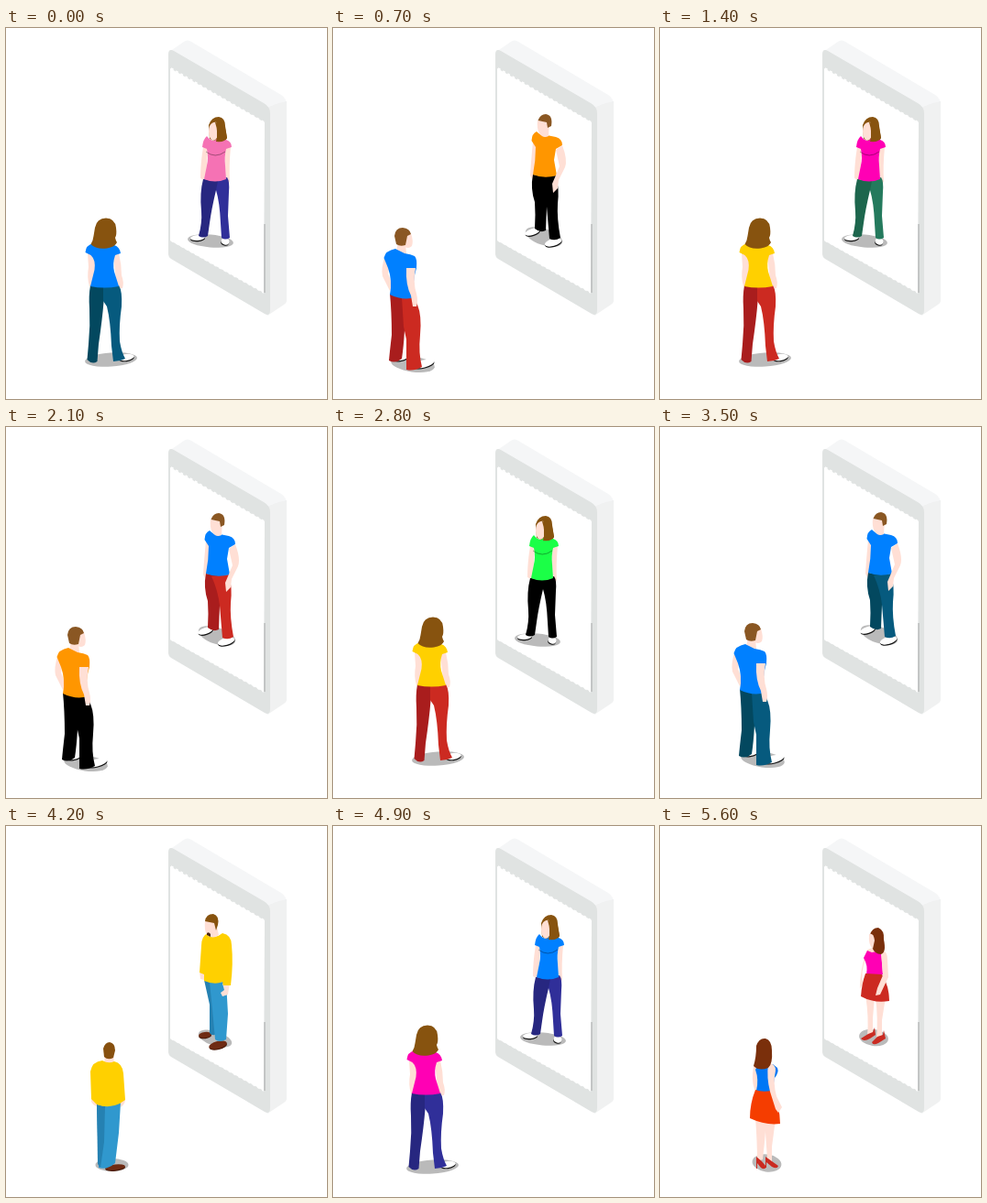
These frames come from a looping animation (350x405 px, 6300 ms). An HTML page:

```html
<!DOCTYPE html>
<html lang="en">
<head>
<meta charset="utf-8">
<title>Mirror outfits</title>
<style>
html, body { margin: 0; width: 100%; height: 100%; overflow: hidden; background: #fff }
svg { display: block; width: 100vw; height: 100vh }
</style>
</head>
<body>
<svg viewBox="0 0 350 405">
  <path fill="#f5f6f7" d="M178 26L194 15Q198 12 202 15L300 73Q306 77 306 84L288 92Z"/>
  <path fill="#f0f1f1" d="M285 88Q290 83 306 80V298Q306 300 303 302L285 314Z"/>
  <path fill="#e0e3e2" d="M177 29Q177 22 183 25L281 82Q288 86 288 93V308Q288 315 282 312L180 252Q177 250 177 247Z"/>
  <path fill="#fff" d="M179 44L282 103L281 289L179 232Z"/>
  <path fill="none" stroke="#fff" stroke-width="1.500" stroke-dasharray="3" d="M180 44L282 103M180 232L281 289"/>
  <path fill="none" stroke="#a5a7a7" d="M282 214V289"/>
  <g id="cast"></g>
</svg>
<script>
const SKIN = '#ffdfd5', BROWN = '#87530f', AUBURN = '#7a2f0b', SHADOW = '#bababa';

const shape = (fill, d) => `<path fill="${fill}" d="${d}"/>`;
const shadow = (x, y, rx, ry, turn = 0) =>
  `<ellipse cx="${x}" cy="${y}" rx="${rx}" ry="${ry}" fill="${SHADOW}" transform="rotate(${turn} ${x} ${y})"/>`;
const shoe = (x, y, rx, ry, turn, fill = '#fff', sole = '#111') =>
  `<g transform="translate(${x} ${y}) rotate(${turn})"><ellipse cy="1.200" rx="${rx}" ry="${ry}" fill="${sole}"/>
  <ellipse rx="${rx}" ry="${ry}" fill="${fill}"/></g>`;

// Each figure takes a top colour and a [dark, light] pair for the lower garment.
const womanBack = (top, [dark, light]) =>
  shadow(114.500, 362, 28.500, 7.500, -4) +
  shoe(131, 359.500, 8.500, 3.500, -8) +
  shape(SKIN, 'M89 246L97 247L97 268L96 284L91 282Q88 272 90 261Z') +
  shape(SKIN, 'M117 248L123 246Q126 258 126 270Q129 278 127 284L121 284Z') +
  shape(dark, 'M92 281Q90 292 91 306Q92 325 90 345L88.500 362Q94 368 99.500 364L101 345Q105 318 106.500 299L109 282Z') +
  shape(light, 'M106 283L123 281Q127 287 126 304Q123 325 124 342Q126 354 130 361Q124 364 117 364L115 347Q114 320 110 304L106 298Z') +
  shape(top, 'M95 235Q87 237 86.500 245L92.500 248Q98 253 96.500 264L92 282Q107 285 123 282L118 266Q116 257 119 248L125 246Q124 239 118 237Z') +
  shape(BROWN, 'M97 218Q99 207.500 109 207.500Q119 208 120 218Q121 226 119 229Q120 233 121 234Q119 239 110 240.500Q98 242 92.500 236Q95 232 95.500 227Z');

const womanFront = (top, [dark, light]) =>
  shadow(223, 232.500, 25, 7, 5) +
  shoe(209, 229, 8, 3, -5) + shoe(239, 233, 4.500, 3.500, 15) +
  shape(SKIN, 'M215 130L220 132L219 150L217 167L212 164Q212 148 215 130Z') +
  shape(SKIN, 'M238 131L245 130Q243 150 244 168L240 171Z') +
  shape(light, 'M215 165Q228 169 241 163Q244 167 243 179L242 205L244 229Q239 232 235 229L234 213Q233 190 229 177Z') +
  shape(dark, 'M215 165L231 167L229 177Q224 198 222 213L220 227Q215 230 210 227Q214 213 213 200Q211 180 215 165Z') +
  shape(BROWN, 'M221 106Q224 97 232 97Q239 98 239 107L241 120Q239 125 231 125L222 121Z') +
  shape(top, 'M219 118Q215 121 214 130L219 132Q221 142 219 150L216 165Q228 170 240 165L239 150Q238 140 240 132L246 130Q246 124 240 122L230 121Q225 126 219 118Z') +
  '<path fill="none" stroke="#0005" d="M218 135Q228 143 239 135"/>' +
  shape(SKIN, 'M222 107Q225 102 230 103L230 120Q226 126 222 119Q220 113 222 107Z') +
  shape(BROWN, 'M228 103L238 104L241 120Q239 125 229 124Q232 115 228 103Z');

const manBack = (top, [dark, light]) =>
  shadow(87, 367, 24, 8.500, 8) +
  shoe(73, 359.500, 9, 3.500, -8) + shoe(99, 366.500, 11.500, 4, -14) +
  shape(SKIN, 'M57 248Q52 262 54 271L62 287L65 281L60 268L62 256Z') +
  shape(dark, 'M62 290L82 294L78 330Q77 348 75 361Q68 367 61 363Q62 352 64 335Q64 310 62 290Z') +
  shape(light, 'M75 294L89 294L92 302Q97 314 95 335Q93 355 97 370Q88 375 80 373L80 340L77 326Z') +
  shape(SKIN, 'M71 233L79 234L80 247L69 244Z') +
  shape(top, 'M68 241Q57 243 55.500 251L60 262Q65 276 62 291Q76 298 90 294L88 277Q89 268 91 262Q92 252 89 249Q85 247 78 246Z') +
  shape(SKIN, 'M80 262L90 262Q87 278 91 290Q93 298 91 304L87 304L85 292Q79 280 80 262Z') +
  shape(SKIN, 'M79 223L85 224Q88 233 86 238Q82 242 77 238Z') +
  shape('#8a5723', 'M67 227Q68 218 76 218Q84 219 85 225L81 227L79 237Q73 239 69 236Z');

const manFront = (top, [dark, light]) =>
  shadow(230, 228, 21, 9, 18) +
  shoe(217.500, 222.500, 8.500, 3.500, -18) + shoe(240, 234, 9.500, 4, -16) +
  shape(SKIN, 'M218 124L223 130L221 150L218 167L215 161Q216 145 218 124Z') +
  shape(dark, 'M218 160L236 163L233 195L232 221Q226 224 220 219Q221 204 220 190Q215 175 218 160Z') +
  shape(light, 'M224 163L243 161Q247 175 245 192Q244 208 248 229Q242 233 236 230L233 195Q231 178 224 163Z') +
  shape(top, 'M222 113Q217 115 216.500 123L221 130Q221 145 218 160Q230 165 244 161L241 144L243 132L250 128Q250 121 243 119L233 117Q228 119 222 113Z') +
  shape(SKIN, 'M243 133L250 128Q256 144 253 152L246 166L245 175L240 180L239 170L242 163L247 151Z') +
  shape(SKIN, 'M223 101L236 103L235 118Q229 121 225 115Q222 110 223 101Z') +
  shape('#8a5723', 'M223.500 101Q226 94 232 94Q240 95 238 107L234 109L233 103Z');

const sweaterBack = (top, [dark, light]) =>
  shadow(115.500, 370, 18, 7) +
  shoe(119, 372.500, 11, 3, -6, '#6f2b13', '#4b1c0b') +
  shape(SKIN, 'M93 296L99 299L99 306Q95 305 93 301Z') +
  shape(SKIN, 'M123 299L130 298Q130 304 125 307Z') +
  shape(light, 'M99 304Q112 308 125 302L123 335L119 368Q110 376 101 373L100 340Z') +
  shape(dark, 'M99 304L108 306L107 345L103 373L100 369Z') +
  shape(SKIN, 'M108 249L117 249L118 260L107 260Z') +
  shape(top, 'M105 256Q94 257 92 268L93 298L99 304Q112 309 124 303L130 299L128 270Q127 259 118 257Q112 260 105 256Z') +
  shape('#87500f', 'M106 243Q108 236 113 236Q119 237 119 245L117 253Q111 256 107 252Z');

const sweaterFront = (top, [dark, light]) =>
  shadow(228, 232, 19, 8, 18) +
  shoe(217, 228, 7, 3, -8, '#6f2b13', '#4b1c0b') + shoe(231, 239, 10, 4, -14, '#6f2b13', '#4b1c0b') +
  shape(SKIN, 'M211 158L216 160L216 168L212 167Z') +
  shape(dark, 'M216 168L230 171L229 227Q225 230 222 226L222 195Z') +
  shape(light, 'M222 171L240 170L242 205L240 233Q233 237 228 233L225 200Z') +
  shape(SKIN, 'M236 172L244 171L242 184L236 186L234 182L238 179Z') +
  shape(top, 'M220 117Q213 120 213 131L211 160L216 162L216 169Q228 174 236 170L237 174L245 174Q248 150 246 130Q246 119 236 117Q228 124 220 117Z') +
  shape(SKIN, 'M217 103L229 106L232 119Q226 124 219 119Q216 114 217 103Z') +
  shape(BROWN, 'M217 104Q218 96 226 96Q233 98 231 108L229 114L227 106Z') +
  shape('#4d2a12', 'M219 117Q221 115 223 118V121L219 119Z');

const skirtBack = (top, [dark, light]) =>
  shadow(116.500, 368, 16, 9.500, 8) +
  shape(SKIN, 'M104 318L116 320L114 345L112 364L106 366Q106 345 104 318Z') +
  shape(SKIN, 'M114 320L126 320L122 350V367L117 364Z') +
  shape('#ca2b22', 'M105 361L111 366L116 372Q114 376 110 373L106 368V374H105Z') +
  shape('#ca2b22', 'M115 361L122 366L129 371Q128 375 122 372L116 367V373H115Z') +
  shape(SKIN, 'M102 262L108 263L107 280L105 292Q100 282 101 270Z') +
  shape(top, 'M106 262L123 260L128 264Q130 269 125 275L122 291Q112 293 105 289Q108 277 104 266Z') +
  shape(light, 'M104 288Q112 291 121 289Q131 305 131 325Q115 327 98 319Q98 303 104 288Z') +
  shape(SKIN, 'M118 259Q126 259 126 267Q123 280 127 295L133 307L129 313L126 309L120 290Q116 275 118 259Z') +
  shape(AUBURN, 'M105 240Q108 231 115 232Q122 234 122 245Q123 260 118 264Q108 268 102 262Q105 252 105 240Z');

const skirtFront = (top, [dark, light]) =>
  shadow(233, 231, 16, 9, 8) +
  shape(SKIN, 'M224 184L234 186L232 210V228L226 229Q228 210 224 184Z') +
  shape(SKIN, 'M235 187L246 187L242 212V232L236 232Q238 210 235 187Z') +
  shape('#ca2b22', 'M234 220L235 228L229 232Q222 236 219 232L227 227L232 225Z') +
  shape('#ca2b22', 'M244 223L246 232L238 237Q232 240 231 236L237 230L243 228Z') +
  shape(SKIN, 'M226 135L234 132L237 142L224 146Q219 158 221 172L218 178Q218 155 226 135Z') +
  shape(top, 'M226 136L231 138L241 136L243 162Q232 166 225 162Q227 152 222 144Z') +
  shape(light, 'M224 161L242 162Q250 175 250 191Q234 194 219 186Q220 172 224 161Z') +
  shape(SKIN, 'M241 137Q248 135 248 146L249 165L240 184L235 185L237 177L243 163Z') +
  shape(AUBURN, 'M229 119Q231 111 238 111Q245 114 244 124Q247 138 241 140Q234 140 231 132Z') +
  shape(SKIN, 'M228 118Q233 116 234 125L232 134Q227 130 228 118Z');

const place = (x, y, figure) => `<g transform="translate(${x} ${y})">${figure}</g>`;
const RED = ['#a91d1d', '#cc2a21'], BLACK = ['#000', '#000'], NAVY = ['#272780', '#302f99'],
  TEAL = ['#03485f', '#065a7e'], GREEN = ['#1d664d', '#247a5d'], DENIM = ['#2581b2', '#3098ce'];

const scenes = [
  womanBack('#0080ff', TEAL) + womanFront('#f572b4', NAVY),
  manBack('#0080ff', RED) + manFront('#ff9600', BLACK),
  womanBack('#ffd000', RED) + womanFront('#ff00b4', GREEN),
  manBack('#ff9600', BLACK) + manFront('#0080ff', RED),
  womanBack('#ffd000', RED) + womanFront('#1bff47', BLACK),
  place(25, -4, manBack('#0080ff', TEAL)) + place(9, -1, manFront('#0080ff', TEAL)),
  sweaterBack('#ffd000', DENIM) + sweaterFront('#ffd000', DENIM),
  place(-6, 10, womanBack('#ff00b4', NAVY)) + place(6, 0, womanFront('#0080ff', NAVY)),
  skirtBack('#0077f5', ['#f53d00', '#f53d00']) + skirtFront('#ff00b4', RED),
];

const HOLD = 700, cast = document.getElementById('cast');
let shown = -1;
function draw() {
  const index = Math.floor(performance.now() / HOLD) % scenes.length;
  if (index !== shown) cast.innerHTML = scenes[shown = index];
  requestAnimationFrame(draw);
}
draw();
</script>
</body>
</html>
```
